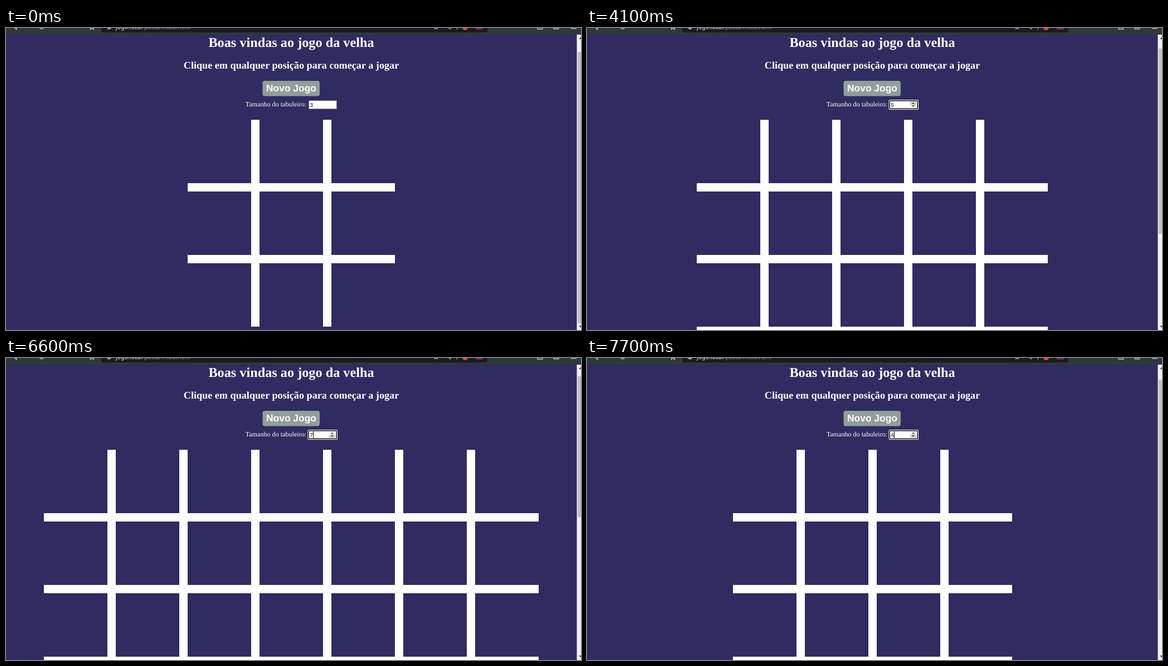
Recreate the animation shown at these times as an HTML page. Size 1032x543 px, loop 8 s.

```html
<!DOCTYPE html>
<html lang="pt">
<head>
<meta charset="utf-8">
<title>Jogo da velha</title>
<style>
  html, body { margin: 0; width: 100%; height: 100%; overflow: hidden; background: #302b60; }
  svg { display: block; width: 1032px; height: 543px; }
  text { text-rendering: geometricPrecision; }
  .serif { font-family: "Liberation Serif", "Times New Roman", serif; fill: #fff; }
  .sans { font-family: "Liberation Sans", Arial, sans-serif; }
  .bold { font-weight: bold; text-anchor: middle; }
  .icon { fill: none; stroke: #c3c7ca; stroke-width: 1.3; }
</style>
</head>
<body>
<svg viewBox="0 0 1032 543">
  <rect width="1032" height="543" fill="#302b60"/>

  <!-- browser bar -->
  <rect width="1032" height="12" fill="#2f373e"/>
  <path d="M171 0H864V4Q864 8 860 8H175Q171 8 171 4Z" fill="#191a22"/>
  <g class="icon">
    <path d="M14 -1L19 2.5V-1"/>
    <path d="M36 1L39 -1" stroke="#596168"/>
    <circle cx="64" cy="-3" r="4.5"/>
    <path d="M151.500 -2V2.500L154.500 .5L157.500 2.500V-2"/>
    <path d="M769 2L772 0L775 2"/>
    <path d="M794 0L798 2V-1" stroke="#8d9298"/>
    <path d="M809.500 0V3" stroke="#8d9298"/>
    <path d="M954 -1V2H963V-1"/>
    <path d="M983 -1V1.500H992V-1"/>
    <path d="M1014 .8H1024"/>
  </g>
  <circle cx="185" cy="-2" r="4.500" fill="#a5a8ad"/>
  <text x="197" y="2" font-size="10.500" font-family="Noto Sans, sans-serif" fill="#9a9ca3"><tspan fill="#f0f0f2">jogo.local</tspan>/pasta/inicio.html</text>
  <circle cx="824" cy="-1" r="5" fill="#f04a24"/>
  <rect x="843" y="-8" width="13" height="10.500" fill="#8d2772"/>

  <!-- page -->
  <text class="serif bold" x="512" y="34" font-size="24.250">Boas vindas ao jogo da velha</text>
  <text class="serif bold" x="512" y="73" font-size="18.180">Clique em qualquer posição para começar a jogar</text>
  <rect x="460.500" y="95" width="102.500" height="27.500" rx="4" fill="#919e9a"/>
  <text id="label" class="sans bold" x="512" y="114" font-size="17.400">Novo Jogo</text>
  <text class="serif" x="429.700" y="141" font-size="12.120">Tamanho do tabuleiro:</text>

  <!-- number field -->
  <rect id="ring" x="541.500" y="129" width="53.500" height="18" rx="2.500" fill="#fff"/>
  <rect id="field" fill="#fff"/>
  <text id="digit" class="sans" x="545.300" y="141.500" font-size="10.100" fill="#111"></text>
  <rect id="caret" x="551" y="132" width="1" height="12" fill="#000"/>
  <g id="spin">
    <rect id="up" x="580" y="132" width="11" height="6"/>
    <rect id="down" x="580" y="138" width="11" height="5.500"/>
    <path id="upArrow" d="M582.700 136.500L585.500 133.500L588.300 136.500Z"/>
    <path id="downArrow" d="M582.700 139L585.500 142L588.300 139Z"/>
  </g>

  <path id="board" fill="#fff"/>

  <!-- scrollbar -->
  <rect x="1024.500" y="12" width="8" height="531" fill="#f1f1f1"/>
  <path d="M1028 20L1032 16V20Z M1028 535L1032 539V535Z" fill="#505050"/>
  <rect id="thumb" x="1026" width="6" fill="#c1c1c1"/>
</svg>
<script>
const $ = id => document.getElementById(id);
const set = (id, attrs) => {
  for (const k in attrs) $(id).setAttribute(k, attrs[k]);
};

const LOOP = 8000, CELL = 114, LINE = 15, TOP = 165;
const start = { n: 3, button: 0, hover: 0, focus: 0, caret: 0, up: 0, down: 0 };

// up/down: 0 idle, 1 hovered, 2 pressed
const steps = [
  [900, { button: 1 }],
  [1400, { button: 0 }],
  [1500, { hover: 1 }],
  [1800, { up: 1 }],
  [2800, { n: 4, focus: 1, caret: 1, up: 2 }],
  [3000, { up: 1 }],
  [3400, { caret: 0 }],
  [3500, { n: 5, caret: 1, up: 2 }],
  [3700, { up: 1 }],
  [4100, { caret: 0 }],
  [4300, { n: 6, caret: 1, up: 2 }],
  [4400, { up: 1 }],
  [4800, { caret: 0 }],
  [5400, { caret: 1 }],
  [5500, { n: 7, up: 2 }],
  [5800, { up: 1 }],
  [5900, { up: 0 }],
  [6000, { caret: 0 }],
  [6300, { down: 1 }],
  [6600, { caret: 1 }],
  [6800, { n: 6, down: 2 }],
  [6900, { down: 1 }],
  [7200, { n: 5, down: 2 }],
  [7400, { down: 1 }],
  [7500, { n: 4, down: 2 }],
  [7700, { down: 1 }]
];

const thumbEnd = { 3: 531, 4: 435, 5: 370, 6: 322, 7: 286 };
const spinFill = ["#f1f1f1", "#d2d2d2", "#787878"];
const arrowFill = ["#505050", "#505050", "#fff"];
const show = on => ({ visibility: on ? "visible" : "hidden" });

function boardPath(n) {
  const pitch = CELL + LINE, size = n * pitch - LINE;
  const left = Math.ceil(512 - size / 2);
  let d = "";
  for (let i = 1; i < n; i++) {
    const at = i * pitch - LINE;
    d += `M${left + at} ${TOP}h${LINE}v${size}h${-LINE}z`;
    d += `M${left} ${TOP + at}h${size}v${LINE}h${-size}z`;
  }
  return d;
}

function draw(s) {
  set("label", { fill: s.button ? "#302b60" : "#fff" });
  set("ring", show(s.focus));
  set("field", s.focus
    ? { x: 543.25, y: 130.75, width: 50, height: 14.5, rx: 1, stroke: "#101010", "stroke-width": 1.5 }
    : { x: 543.5, y: 130.5, width: 50, height: 15, rx: 0, stroke: s.hover ? "#4f4f4f" : "#767676", "stroke-width": 1 });
  $("digit").textContent = s.n;
  set("caret", show(s.caret));
  set("spin", show(s.hover));
  for (const side of ["up", "down"]) {
    set(side, { fill: spinFill[s[side]] });
    set(side + "Arrow", { fill: arrowFill[s[side]] });
  }
  set("board", { d: boardPath(s.n) });
  const y = s.n === 3 ? 43 : 47 - 2 * s.n;
  set("thumb", { y, height: thumbEnd[s.n] - y });
}

let shown = -1;
function frame(now) {
  const t = now % LOOP;
  const past = steps.filter(([at]) => at <= t);
  if (past.length !== shown) {
    shown = past.length;
    draw(Object.assign({}, start, ...past.map(p => p[1])));
  }
  requestAnimationFrame(frame);
}
frame(performance.now());
</script>
</body>
</html>
```
